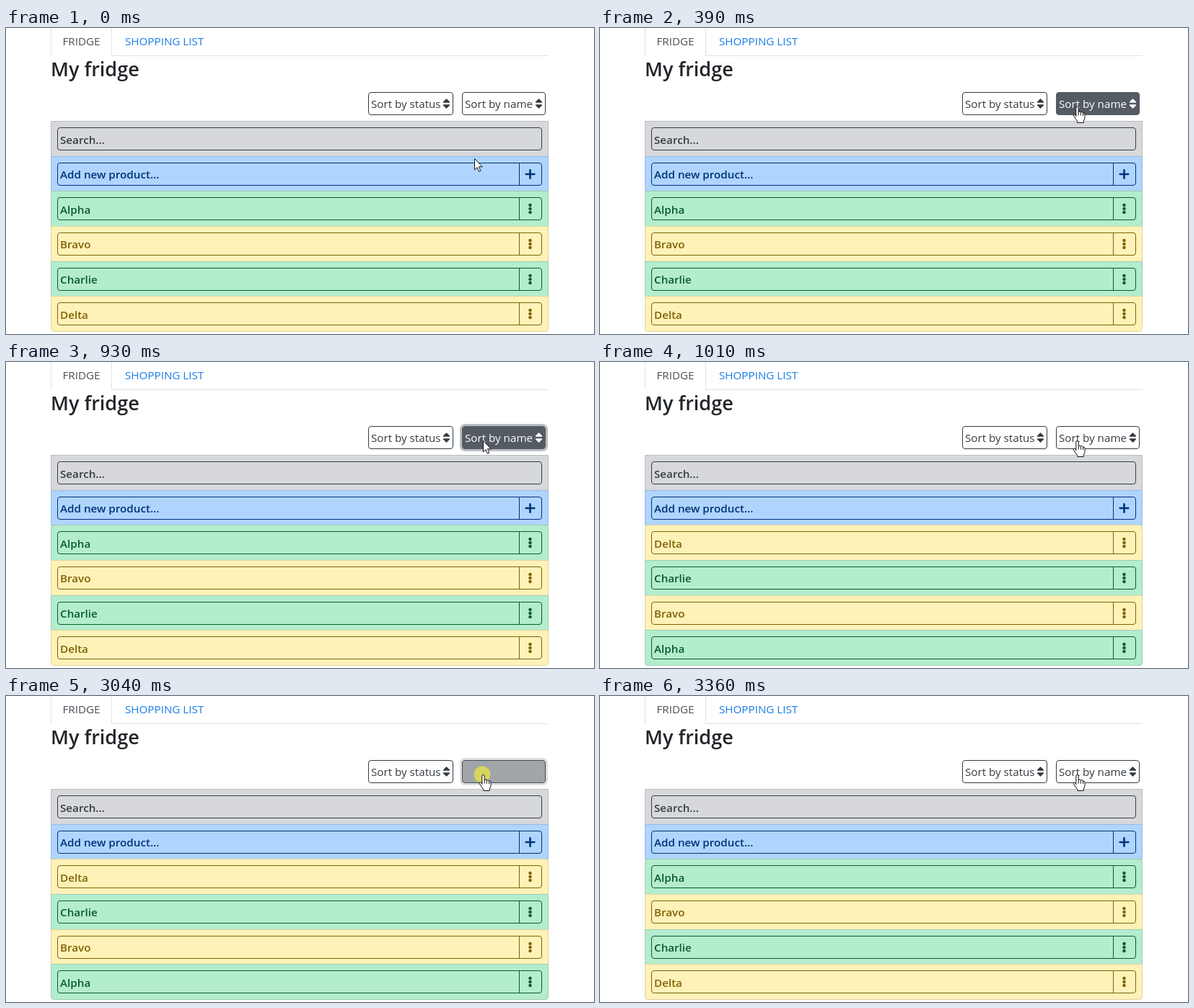
These frames come from a looping animation (815x425 px, 3.89 s). An HTML page:

```html
<!DOCTYPE html>
<html lang="en">
<head>
<meta charset="utf-8">
<title>My fridge</title>
<style>
html, body { margin: 0; width: 100%; height: 100%; overflow: hidden; background: #fff; }
svg { display: block; width: 815px; height: 425px; }
text { font: 400 15.2px "Open Sans", "Noto Sans", sans-serif; white-space: pre; }
.bold { font-weight: 600; }
.title { font-size: 27px; font-weight: 600; }
</style>
</head>
<body>
<svg id="stage" viewBox="0 0 815 425"></svg>
<script>
const LOOP = 3890;
const stage = document.getElementById("stage");

function add(parent, tag, attrs, content) {
  const el = document.createElementNS("http://www.w3.org/2000/svg", tag);
  set(el, attrs);
  if (content) el.textContent = content;
  parent.appendChild(el);
  return el;
}
function set(el, attrs) {
  for (const k in attrs) el.setAttribute(k, attrs[k]);
}
const mix = (a, b, k) => `rgb(${a.map((v, i) => Math.round(v + (b[i] - v) * k))})`;

const THEMES = {
  gray: { bg: "#d6d8db", ink: "#383d41" },
  blue: { bg: "#afd5ff", ink: "#003277" },
  green: { bg: "#b4ecce", ink: "#0a5a30" },
  yellow: { bg: "#fff2b8", ink: "#7f6207" }
};

// Page header
add(stage, "rect", { width: 815, height: 425, fill: "#fff" });
add(stage, "path", { d: "M62.5 0V38M146.5 0V38.5H752", fill: "none", stroke: "#dee2e6" });
add(stage, "text", { x: 78.5, y: 24, fill: "#495057" }, "FRIDGE");
add(stage, "text", { x: 165, y: 24, fill: "#1a7fe8" }, "SHOPPING LIST");
add(stage, "text", { x: 62, y: 67, fill: "#212529", class: "title" }, "My fridge");

// Sort buttons
function sortButton(x, w, label) {
  const ring = add(stage, "rect", {
    x: x - 1.5, y: 87.5, width: w + 3, height: 35, rx: 5.5,
    fill: "none", stroke: "#b9bec3", "stroke-width": 3, opacity: 0
  });
  const box = add(stage, "rect", {
    x: x + .5, y: 89.5, width: w - 1, height: 31, rx: 3.5, fill: "#fff", stroke: "#343a40"
  });
  const ink = add(stage, "g", { fill: "#343a40" });
  add(ink, "text", { x: x + 4, y: 111 }, label);
  const c = x + w - 9.5;
  add(ink, "path", {
    d: `M${c - 4} 103L${c} 99L${c + 4} 103ZM${c - 4} 107H${c + 4}L${c} 111Z`,
    stroke: "currentColor", "stroke-width": 1.4, "stroke-linejoin": "round"
  });
  return { ring, box, ink };
}
function paintButton(b, hover, ring) {
  const dark = [52, 58, 64], gray = [84, 91, 98], white = [255, 255, 255];
  const ink = mix(dark, white, hover);
  set(b.box, { fill: mix(white, gray, hover), stroke: mix(dark, gray, hover) });
  set(b.ink, { fill: ink, color: ink });
  set(b.ring, { opacity: ring });
}
paintButton(sortButton(502, 118, "Sort by status"), 0, 0);
const nameButton = sortButton(632, 116, "Sort by name");

// List rows
const TOPS = [129, 178, 226, 275, 324, 372, 421];
const BASELINES = [161, 209, 258, 306, 355, 404];

function row(parent, i, label, theme) {
  const { bg, ink } = THEMES[theme];
  const y = TOPS[i], end = TOPS[i + 1];
  const a = i === 2 ? 4 : 0, b = i === 5 ? 4 : 0;
  const d = `M${62.5 + a} ${y + .5}H${751.5 - a}q${a} 0 ${a} ${a}V${end + .5 - b}` +
    `q0 ${b} ${-b} ${b}H${62.5 + b}q${-b} 0 ${-b} ${-b}V${y + .5 + a}q0 ${-a} ${a} ${-a}Z`;
  add(parent, "path", { d, fill: bg, stroke: bg });
  add(parent, "path", { d, fill: "none", stroke: "#000", "stroke-opacity": .125 });
  add(parent, "rect", {
    x: 71.5, y: y + 9.5, width: 671, height: 31, rx: 3.5, fill: "none", stroke: ink
  });
  add(parent, "text", { x: 75, y: BASELINES[i], fill: ink, class: "bold" }, label);
  if (!i) return;
  add(parent, "path", { d: `M711.5 ${y + 9.5}v31`, stroke: ink });
  const cy = y + 25;
  if (i === 1) {
    add(parent, "path", {
      d: `M720.7 ${cy}h11.6M726.5 ${cy - 5.8}v11.6`,
      stroke: ink, "stroke-width": 2.6, "stroke-linecap": "round"
    });
  } else {
    for (const dy of [-5, 0, 5]) add(parent, "circle", { cx: 726.5, cy: cy + dy, r: 2.25, fill: ink });
  }
}
row(stage, 0, "Search...", "gray");
row(stage, 1, "Add new product...", "blue");

const ITEMS = [["Alpha", "green"], ["Bravo", "yellow"], ["Charlie", "green"], ["Delta", "yellow"]];
function list(items) {
  const g = add(stage, "g", {});
  items.forEach(([label, theme], i) => row(g, i + 2, label, theme));
  return g;
}
const ascending = list(ITEMS);
const descending = list([...ITEMS].reverse());

// Pointer, with its hotspot at 0,0
const glow = add(stage, "circle", { cx: 660, cy: 109, r: 11.5, fill: "#f5f032", opacity: 0 });
const pointer = add(stage, "g", { fill: "#fff", stroke: "#111", "stroke-linejoin": "round" });
const arrow = add(pointer, "path", {
  d: "M.5 .5V16L4 12.7L6.4 18.3L8.8 17.3L6.5 11.8H11.3Z"
});
const hand = add(pointer, "g", {});
add(hand, "path", {
  d: "M-1.2 14V2Q-1.2 .4 .5 .4T2.2 2V8Q2.6 6.8 4 7T5.4 8.4Q6 7.4 7.2 7.8T8.5 9.3" +
    "Q11 8.4 11 11V15.5Q11 18 9.2 20V22.5H.8V20.5Q-1.5 18-3.2 15Q-5.4 12.2-4.6 11.2Q-3.2 10-1.2 13"
});
add(hand, "path", { d: "M2.2 8V12.5M5.4 8.4V12.8M8.5 9.3V13", fill: "none" });

// time, travel (0 to 1), hand, hover, focus ring, click glow
const STEPS = [
  [0, 0, 0, 0, 0, 0],
  [80, .2, 0, 0, 0, 0],
  [158, .55, 0, 0, 0, 0],
  [235, .87, 1, .1, 0, 0],
  [313, 1, 1, .65, 0, 0],
  [390, 1, 1, 1, 0, 0],
  [770, 1, 1, 1, 0, 1],
  [850, 1, 1, 1, .7, 1],
  [930, 1, 0, 1, 1, 0],
  [1010, 1, 1, 0, 0, 0],
  [2950, 1, 1, .09, 0, 1],
  [3040, 1, 1, .55, .5, 1],
  [3110, 1, 1, .9, .9, 0],
  [3190, 1, 1, 1, 1, 0],
  [3360, 1, 1, 0, 0, 0]
];
const show = (el, on) => set(el, { visibility: on ? "visible" : "hidden" });

function draw(t) {
  const [, travel, isHand, hover, ring, click] = STEPS.filter(s => s[0] <= t).pop();
  const flipped = t >= 1010 && t < 3360;
  show(ascending, !flipped);
  show(descending, flipped);
  paintButton(nameButton, hover, ring);
  set(glow, { opacity: click * .65 });
  show(arrow, !isHand);
  show(hand, isHand);
  const x = Math.round(649 + 12 * travel), y = Math.round(181 - 72 * travel);
  set(pointer, { transform: `translate(${x} ${y})` });
}

const start = performance.now();
function tick() {
  draw((performance.now() - start) % LOOP);
  requestAnimationFrame(tick);
}
draw(0);
requestAnimationFrame(tick);
</script>
</body>
</html>
```
